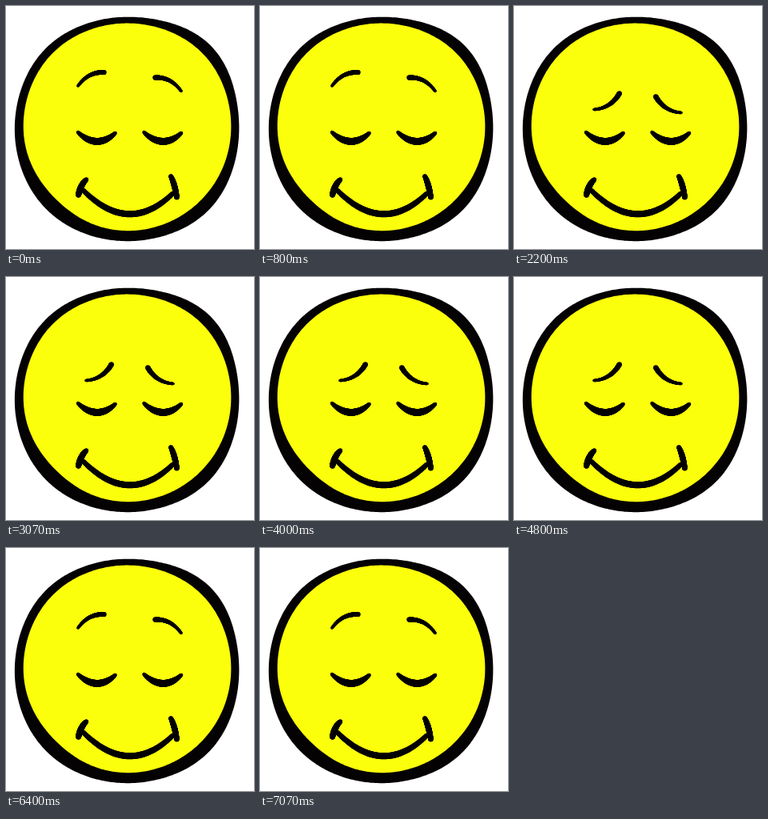
Animation, 310 px wide and 304 px high, one loop 7390 ms. Source, as an HTML page with a canvas:

```html
<!DOCTYPE html>
<html lang="en">
<head>
<meta charset="utf-8">
<title>Smiley</title>
<style>
  html, body { margin: 0; width: 310px; height: 304px; overflow: hidden; background: #fff; }
  canvas { display: block; }
</style>
</head>
<body>
<canvas id="stage" width="310" height="304"></canvas>
<script>
const ctx = document.getElementById('stage').getContext('2d');
const LOOP = 7390;
const YELLOW = '#fcff0b';
const INK = '#050203';
const AXIS = 154.5; // mirror line of the brows

// Left brow: thin end, control point, thick end
const raised = [90, 100, 103, 82, 123, 83];
const worried = [100, 129.5, 121, 128, 132, 109];

const mix = (a, b, u) => a + (b - a) * u;

// Rises from 0 to 1 in n equal jumps between two times
function steps(t, from, to, n) {
  const k = Math.floor((t - from) / (to - from) * (n - 1) + 1.001);
  return Math.min(n, Math.max(0, k)) / n;
}

// Circle pushed in or out on its diagonals, clockwise from lower right
function blob(x, y, r, bumps, color) {
  ctx.fillStyle = color;
  ctx.beginPath();
  for (let a = 0; a < 2 * Math.PI; a += 0.02) {
    const d = bumps.reduce((sum, b, i) =>
      sum + b * Math.max(0, Math.cos(a - (i + 0.5) * Math.PI / 2)) ** 10, r);
    ctx.lineTo(x + d * Math.cos(a), y + d * Math.sin(a));
  }
  ctx.fill();
}

// Quadratic curve whose radius goes from r0 to r1, swollen by belly halfway
function brush([x0, y0, cx, cy, x1, y1], r0, r1, belly = 0) {
  ctx.fillStyle = INK;
  for (let u = 0; u <= 1; u += 0.01) {
    const x = mix(mix(x0, cx, u), mix(cx, x1, u), u);
    const y = mix(mix(y0, cy, u), mix(cy, y1, u), u);
    ctx.beginPath();
    ctx.arc(x, y, mix(r0, r1, u) + belly * Math.sin(Math.PI * u), 0, 7);
    ctx.fill();
  }
}

function draw(t) {
  const worry = steps(t, 1130, 1270, 3) - steps(t, 6200, 6400, 4);
  ctx.clearRect(0, 0, 310, 304);

  blob(151, 154, 140, [4, 2, 3, 8], INK);
  blob(151.5, 151.5, 129.8, [0, -3, 1.5, 2], YELLOW);

  const brow = raised.map((v, i) => mix(v, worried[i], worry));
  const drop = mix(6.5, 4, worry);
  brush(brow, 1.8, 3.1);
  brush(brow.map((v, i) => i % 2 ? v + drop : 2 * AXIS - v), 1.8, 3.1);

  for (const x of [114, 196.5])
    brush([x - 24, 158, x, 180.5, x + 23, 158.5], 2.2, 2.2, 2.2);

  brush([97, 231, 154, 288, 209, 234], 3, 3, 1);
  brush([100.5, 217, 93, 224, 90.5, 236.5], 2.6, 3.4, 0.6);
  brush([206, 213, 211, 223, 213.5, 239.5], 2.7, 3.2, 0.6);
}

function frame() {
  draw(performance.now() % LOOP);
  requestAnimationFrame(frame);
}
frame();
</script>
</body>
</html>
```
